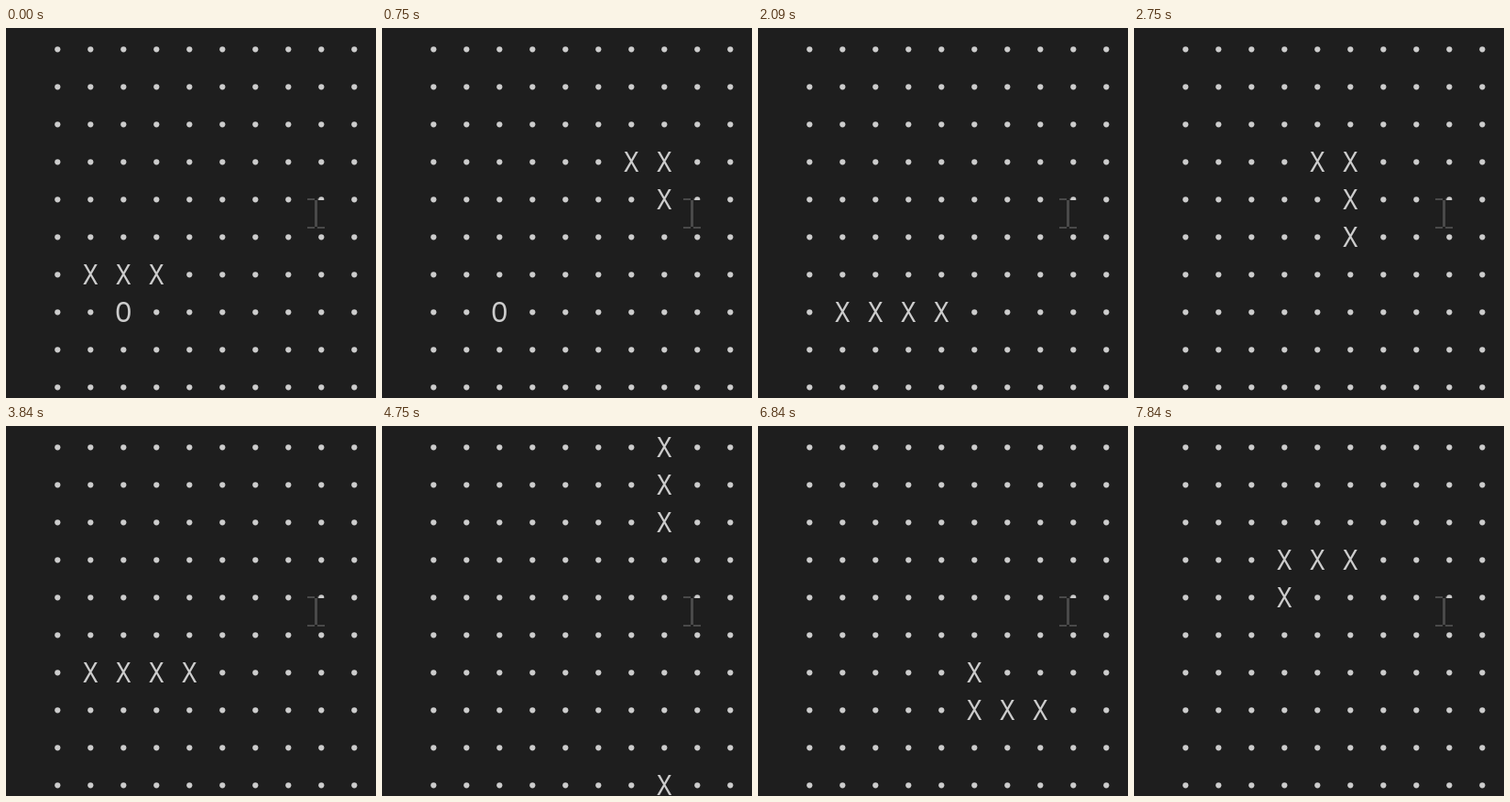
Write an HTML page with a canvas that moves like this. It is 404 by 404 pixels and loops after 8000 ms.

```html
<!DOCTYPE html>
<html lang="en">
<head>
<meta charset="utf-8">
<title>Console snake</title>
<style>
  html, body { margin: 0; width: 100%; height: 100%; overflow: hidden; background: #1e1e1e; }
  canvas { display: block; }
</style>
</head>
<body>
<canvas id="stage" width="404" height="404"></canvas>
<script>
const ctx = document.getElementById('stage').getContext('2d');
const SIZE = 10, LOOP = 8000, TICKS = 96;
const FOOD = [2, 7];
const INK = '#cccccc', BACK = '#1e1e1e';
const STEP = { R: [1, 0], L: [-1, 0], U: [0, -1], D: [0, 1] };

// Direction and number of ticks; a dot waits.
const ROUTE = 'R3 .1 R1 U3 L2 D5 L1 .1 L2 .1 L1 U1 R3 .1 R1 U4 L1 .1 D3 R13 ' +
  'U6 .1 U4 L6 U3 R6 D4 L2 U1 .1 U1 R2 .1 U2 L4 D1 .1';

const wrap = n => (n + SIZE) % SIZE;
const same = (a, b) => a[0] === b[0] && a[1] === b[1];
const colX = c => 56.3 + 36 * c;
const rowY = r => 23 + 41 * r;

function plan() {
  let body = [[1, 6], [2, 6], [3, 6]], eaten = false;
  const states = [{ body, eaten }];
  for (const run of ROUTE.split(' ')) {
    const step = STEP[run[0]];
    for (let i = 0; i < +run.slice(1); i++) {
      if (step) {
        const [x, y] = body[body.length - 1];
        const head = [wrap(x + step[0]), wrap(y + step[1])];
        const grows = !eaten && same(head, FOOD);
        eaten = eaten || grows;
        body = [...body.slice(grows ? 0 : 1), head];
      }
      states.push({ body, eaten });
    }
  }
  return states;
}

function drawPointer() {
  ctx.fillStyle = BACK;
  ctx.fillRect(339, 188, 10, 4);
  ctx.fillStyle = '#4a4a4a';
  ctx.fillRect(329, 186, 8, 2);
  ctx.fillRect(340, 186, 1, 2);
  ctx.fillRect(347, 186, 1, 2);
  ctx.fillRect(337, 188, 3, 29);
  ctx.fillRect(329, 217, 8, 2);
  ctx.fillRect(340, 217, 8, 2);
}

function draw({ body, eaten }) {
  ctx.fillStyle = BACK;
  ctx.fillRect(0, 0, 404, 404);
  ctx.font = '30px "Noto Sans Mono", monospace';
  ctx.textAlign = 'center';
  for (let r = 0; r < SIZE; r++) {
    for (let c = 0; c < SIZE; c++) {
      const cell = [c, r];
      const mark = body.some(p => same(p, cell)) ? 'X'
        : !eaten && same(FOOD, cell) ? 'O' : '';
      ctx.fillStyle = INK;
      if (mark) {
        ctx.fillText(mark, colX(c), rowY(r) + 11);
      } else {
        ctx.beginPath();
        ctx.arc(colX(c), rowY(r) + 0.3, 3.1, 0, 2 * Math.PI);
        ctx.fill();
      }
    }
  }
  drawPointer();
}

const states = plan();

function frame() {
  const t = performance.now() % LOOP;
  draw(states[Math.floor(t / LOOP * TICKS)]);
  requestAnimationFrame(frame);
}
frame();
</script>
</body>
</html>
```
